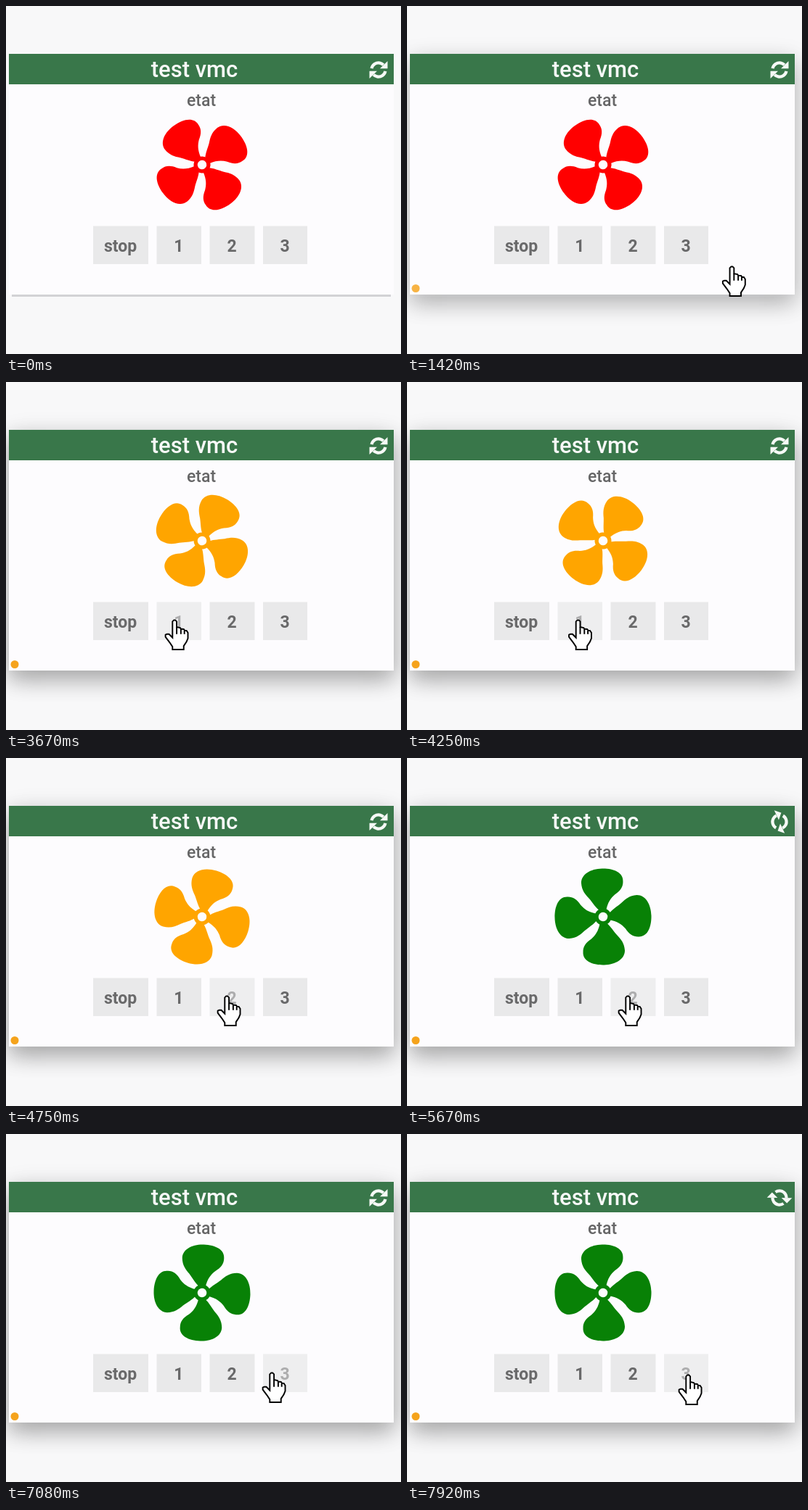
Recreate the animation shown at these times as an HTML page with a canvas. Size 544 px wide and 480 px high, loop 8000 ms.

```html
<!DOCTYPE html>
<html lang="fr">
<head>
<meta charset="utf-8">
<title>test vmc</title>
<style>
html, body { margin: 0; width: 100%; height: 100%; overflow: hidden; background: #f8f8f9; }
canvas { display: block; }
</style>
</head>
<body>
<canvas id="stage" width="544" height="480"></canvas>
<script>
const ctx = document.getElementById('stage').getContext('2d');
const LOOP = 8000, FPS = 12;
const BG = '#f8f8f9', CARD = '#fdfcfe';
const ICON = { x: 513, y: 88 }, FAN = { x: 270, y: 219 };

const buttons = [
  { label: 'stop', x: 120, w: 76 },
  { label: '1', x: 207.5, w: 61.5 },
  { label: '2', x: 280.5, w: 62 },
  { label: '3', x: 354, w: 61 }
];
const BTN_Y = 303.5, BTN_H = 52.5;

// Pointer tip: time, x, y
const path = [
  [1120, 548, 372], [1900, 237, 335], [2830, 237, 335], [3100, 232, 329],
  [4200, 232, 329], [4580, 304, 329], [6050, 304, 329], [6650, 366, 330],
  [7170, 366, 330], [7700, 387, 333]
];
const HOVER_AT = 1160;
const spins = [[2130, 3170], [5060, 6000], [7670, 8000]];

// Fan states: start, colour, degrees per second
const states = [
  { at: 0, color: '#ff0000', speed: 0 },
  { at: 3458, color: '#ffa500', speed: 320 },
  { at: 5558, color: '#088106', speed: 320 }
];
const REST = 54;

const blade = new Path2D(
  'M4.5-9C7-20 11-25.5 17-30.5C25-35.5 28.5-41 28.5-48C29.5-60.5 16-66.5 0-66.5' +
  'C-16-66.5-29-59-29-47C-28.5-37-24-31.5-18.5-25.5C-14-20-10-13-5-9Z');
const hand = new Path2D(
  'M5.5 1.5L6.5.5H7.5L8.5 1.5V5.5L11 6L11.5 6.8L13.5 7L14.3 8L15.5 8L16.5 9.5' +
  'V13.5L15.5 16L13.5 19V21.5H5.5V19.5L3.5 16.5L.5 12.5V11L1.5 10.5H3L5.5 13Z');
const knuckles = new Path2D('M8.5 5.5V10.5M11.5 7V10.5M14 8V10.5');

const clamp = v => Math.max(0, Math.min(1, v));
const smooth = v => v * v * (3 - 2 * v);

function box(color, x, y, w, h) {
  ctx.fillStyle = color;
  ctx.fillRect(x, y, w, h);
}

function disc(color, x, y, r) {
  ctx.fillStyle = color;
  ctx.beginPath();
  ctx.arc(x, y, r, 0, Math.PI * 2);
  ctx.fill();
}

function text(str, x, y, font, color) {
  ctx.font = font + ' Roboto, sans-serif';
  ctx.textAlign = 'center';
  ctx.fillStyle = color;
  ctx.fillText(str, x, y);
}

function at(x, y, deg, draw) {
  ctx.save();
  ctx.translate(x, y);
  ctx.rotate(deg * Math.PI / 180);
  draw();
  ctx.restore();
}

function pointerAt(t) {
  if (t < path[0][0]) return null;
  for (let i = 1; i < path.length; i++) {
    const [t0, x0, y0] = path[i - 1], [t1, x1, y1] = path[i];
    if (t < t1) {
      const k = smooth((t - t0) / (t1 - t0));
      return { x: x0 + (x1 - x0) * k, y: y0 + (y1 - y0) * k };
    }
  }
  const [, x, y] = path[path.length - 1];
  return { x, y };
}

function drawShadow(blur, dy, alpha) {
  ctx.save();
  ctx.shadowColor = `rgba(0,0,0,${alpha})`;
  ctx.shadowBlur = blur;
  ctx.shadowOffsetY = dy;
  box(CARD, 4, 66, 530, 332);
  ctx.restore();
}

function drawCard(hover) {
  box(BG, 0, 0, 544, 480);
  if (hover > 0) {
    drawShadow(28, 13, 0.2 * hover);
    drawShadow(33, 10, 0.19 * hover);
  }
  ctx.globalAlpha = 1 - hover;
  box('#d2d2d5', 8, 398, 522, 3);
  ctx.globalAlpha = 1;
  box(CARD, 4, 107, 530, 291);
  box('#39774a', 4, 66, 530, 42);
  text('test vmc', 259.5, 98, '500 31px', '#f8f9f8');
  text('etat', 269, 138, '500 23px', '#666667');
  if (hover > 0) {
    ctx.globalAlpha = hover;
    disc('#f5a31c', 12, 389.5, 5.5);
    ctx.globalAlpha = 1;
  }
}

function drawSync(deg) {
  at(ICON.x, ICON.y, deg, () => {
    ctx.fillStyle = ctx.strokeStyle = '#f6f9f6';
    ctx.lineWidth = 4.2;
    for (let i = 0; i < 2; i++) {
      ctx.beginPath();
      ctx.arc(0, 0, 9.6, Math.PI * 1.06, Math.PI * 1.75);
      ctx.stroke();
      ctx.beginPath();
      ctx.moveTo(12.5, -12);
      ctx.lineTo(12.5, -1.8);
      ctx.lineTo(2, -1.8);
      ctx.fill();
      ctx.rotate(Math.PI);
    }
  });
}

function drawFan(color, deg) {
  at(FAN.x, FAN.y, deg, () => {
    ctx.fillStyle = color;
    for (let i = 0; i < 4; i++) {
      ctx.fill(blade);
      ctx.rotate(Math.PI / 2);
    }
    disc(color, 0, 0, 11.5);
    disc(CARD, 0, 0, 6.3);
  });
}

function drawButtons(tip) {
  for (const { label, x, w } of buttons) {
    const over = tip && tip.x >= x && tip.x <= x + w &&
      tip.y >= BTN_Y && tip.y <= BTN_Y + BTN_H;
    box(over ? '#eeeeef' : '#e9e9ea', x, BTN_Y, w, BTN_H);
    text(label, x + w / 2 - 0.4, 339, '700 23px', over ? '#adadae' : '#69696a');
  }
}

function drawHand(tip) {
  at(tip.x, tip.y, 0, () => {
    ctx.scale(1.93, 1.93);
    ctx.translate(-6.9, -0.8);
    ctx.fillStyle = '#fff';
    ctx.strokeStyle = '#000';
    ctx.lineWidth = 1;
    ctx.fill(hand);
    ctx.stroke(hand);
    ctx.stroke(knuckles);
  });
}

function render(t) {
  const tip = pointerAt(t);
  const spin = spins.find(([a, b]) => t >= a && t < b);
  const state = states.filter(s => t >= s.at).pop();
  drawCard(smooth(clamp((t - HOVER_AT) / 350)));
  drawSync(spin ? (t - spin[0]) * 0.18 : 0);
  drawFan(state.color, REST + (t - state.at) / 1000 * state.speed);
  drawButtons(tip);
  if (tip) drawHand(tip);
}

function tick(now) {
  const step = Math.floor((now % LOOP) * FPS / 1000 + 0.1);
  render(step % (LOOP * FPS / 1000) * 1000 / FPS);
  requestAnimationFrame(tick);
}
requestAnimationFrame(tick);
</script>
</body>
</html>
```
